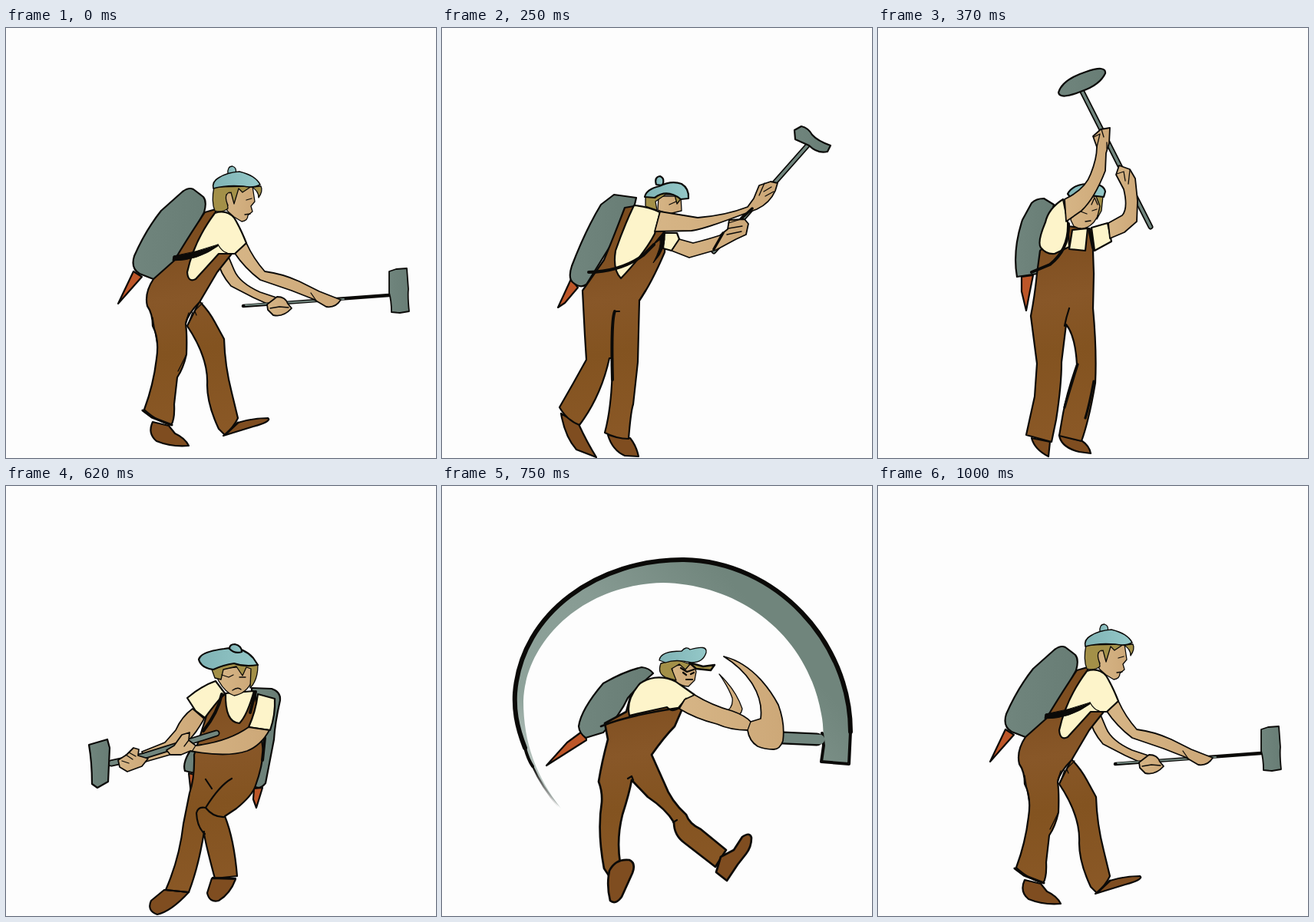
Write an HTML page without scripts that moves like this. It is 560 px wide and 560 px high and loops after 1120 ms.

```html
<!DOCTYPE html>
<html lang="en">
<head>
<meta charset="utf-8">
<title>Hammer swing</title>
<style>
html, body { margin: 0; width: 100%; height: 100%; overflow: hidden; background: #fdfdfd; }
svg { display: block; width: 100%; height: 100%; }
path { stroke: #0b0a08; stroke-width: 2.2; stroke-linejoin: round; stroke-linecap: round; fill: none; }
.brown { fill: url(#brown); }
.shoe { fill: #7f4d20; }
.skin { fill: url(#skin); stroke-width: 1.8; }
.grey { fill: url(#grey); }
.cream { fill: #fdf4ca; }
.cap { fill: url(#cap); }
.hair { fill: #a39048; stroke-width: 1.3; }
.fire { fill: #bd5628; }
.ink { fill: #0b0a08; stroke-width: 1; }
.thin { stroke-width: 1.3; }
.strap { stroke-width: 4; }
.rod { stroke-width: 7; }
.core { stroke: #71867e; stroke-width: 3.5; }
.none { stroke: none; }
.smash .brown, .smash .shoe { stroke-width: 2.7; }

/* Each pose is held for its slot, then hidden until the next loop. */
.pose { visibility: hidden; animation: short 1120ms step-end infinite; }
.long { animation-name: long; }
.rest { animation-name: rest; animation-delay: -120ms; }
.lift { animation-delay: -1000ms; }
.raise { animation-delay: -870ms; }
.top { animation-delay: -750ms; }
.turn { animation-delay: -620ms; }
.wind { animation-delay: -500ms; }
.smash { animation-delay: -370ms; }
.settle { animation-delay: -250ms; }
@keyframes short { 0% { visibility: visible } 10.714% { visibility: hidden } 100% { visibility: hidden } }
@keyframes long { 0% { visibility: visible } 11.607% { visibility: hidden } 100% { visibility: hidden } }
@keyframes rest { 0% { visibility: visible } 21.428% { visibility: hidden } 100% { visibility: hidden } }
</style>
</head>
<body>
<svg viewBox="0 0 560 560">
<defs>
  <linearGradient id="brown" gradientUnits="userSpaceOnUse" x1="200" y1="260" x2="240" y2="530">
    <stop offset="0" stop-color="#7c4c1e"/><stop offset=".35" stop-color="#885728"/>
    <stop offset=".6" stop-color="#835320"/><stop offset="1" stop-color="#8a5826"/>
  </linearGradient>
  <linearGradient id="skin"><stop offset="0" stop-color="#d6b586"/><stop offset="1" stop-color="#cda878"/></linearGradient>
  <linearGradient id="grey"><stop offset="0" stop-color="#70857d"/><stop offset="1" stop-color="#687d75"/></linearGradient>
  <linearGradient id="cap"><stop offset="0" stop-color="#7fb3b5"/><stop offset="1" stop-color="#94c8c8"/></linearGradient>
  <linearGradient id="smear" gradientUnits="userSpaceOnUse" x1="110" y1="400" x2="400" y2="150">
    <stop offset="0" stop-color="#8fa39b" stop-opacity=".4"/><stop offset=".2" stop-color="#8fa39b"/>
    <stop offset=".6" stop-color="#879b93"/><stop offset="1" stop-color="#70857c"/>
  </linearGradient>
  <linearGradient id="tail" gradientUnits="userSpaceOnUse" x1="118" y1="365" x2="152" y2="418">
    <stop offset="0" stop-color="#0b0a08"/><stop offset="1" stop-color="#0b0a08" stop-opacity="0"/>
  </linearGradient>

  <g id="walker">
    <path class="shoe" d="M283 531L302 514Q322 508 341 508Q347 512 322 519Z"/>
    <path class="brown" d="M252 356Q264 368 272 383L284 405Q285 440 294 475L302 508Q297 519 285 530L277 522Q262 490 262 465Q264 430 236 388Z"/>
    <path class="shoe" d="M191 513Q184 528 196 538Q216 546 238 544Q233 534 220 528L212 518Z"/>
    <path class="grey" d="M230 213Q238 207 244 210L257 220Q262 226 258 240L217 315Q207 329 192 327L174 320Q162 313 167 297Q182 263 202 238Z"/>
    <path class="fire" d="M166 317L146 359L177 324Z"/>
    <path class="brown" d="M273 236L259 240Q240 268 219 303L192 327Q180 345 184 362Q191 372 191 388Q200 405 196 431Q192 465 180 497Q196 512 215 517Q220 510 219 490L223 455Q231 443 235 425Q236 400 234 385Q237 372 252 357L275 318L294 294L272 287Z"/>
    <path class="thin" d="M191 377L197 413M234 383L238 371M238 384L243 370M246 369L248 374M247 367L256 358M235 425L224 447"/>
    <path class="strap" style="stroke-width:3" d="M178 498L190 507L216 517M286 529L302 514"/>
    <path class="cream" d="M272 241Q245 277 236 318Q237 332 247 327L277 294L298 294L313 280Q305 260 297 247Q287 236 272 241Z"/>
    <path class="thin" d="M276 282Q282 292 288 293"/>
    <path class="ink" d="M276 282Q248 292 218 297L217 303Q250 303 276 284Z"/>
    <path class="skin thin" d="M290 207L321 206L324 226L319 232L321 239L315 244Q315 251 307 252L297 246L288 238L285 218Z"/>
    <path class="hair" d="M271 207Q267 226 272 238Q282 241 289 235L287 217L293 214L297 229L303 209L308 214L320 206Z"/>
    <path class="skin thin" d="M289 231Q283 217 291 214"/>
    <path class="thin" d="M313 224L320 222M311 243L318 242"/>
    <path class="hair" d="M320 207L332 206Q335 212 329 221Q329 212 320 207Z"/>
    <path class="cap thin" d="M289 190Q288 180 295 180Q301 182 299 189Z"/>
    <path class="cap" style="stroke-width:1.6" d="M270 209Q268 200 277 195Q288 188 304 187Q325 192 331 204Q322 209 309 206Q287 204 270 209Z"/>
  </g>

  <g id="reach">
    <path class="skin" d="M275 301Q279 320 293 336L322 351L342 360L355 352L331 344Q304 332 297 315L289 296Z"/>
    <path style="stroke-width:4.6" d="M309 362L499 348"/><path class="core" style="stroke-width:1.8" d="M312 361L440 353"/>
    <path class="grey" style="stroke-width:1.8" d="M499 317L508 314L522 313L524 340Q523 350 525 369L513 371L502 370Q502 355 499 345Z"/>
    <path class="skin" d="M340 360L353 350Q364 350 367 359L372 365Q361 377 348 374L341 367Z"/>
    <path class="thin" d="M344 365L356 363L368 364"/>
    <path class="skin" d="M297 292L313 280Q322 300 337 317Q360 320 382 330L408 343L436 354Q429 365 417 363L400 353L372 342L331 328Q311 313 297 292Z"/>
    <path class="thin" d="M397 345L404 355"/>
  </g>

  <g id="twister">
    <path class="grey" d="M320 263L346 264Q358 268 357 279Q350 310 349 330L338 387Q330 397 322 390Z"/>
    <path class="fire" d="M323 394L322 408L326 419L334 393ZM238 374L241 401L245 376Z"/>
    <path class="grey" d="M243 340Q229 360 233 371L246 374L252 340Z"/>
    <path class="shoe" d="M206 526L189 540Q183 553 197 558Q215 554 238 529Z"/>
    <path class="shoe" d="M268 511L262 530Q265 543 277 540Q292 531 299 512Z"/>
    <path class="brown" d="M264 290L284 272L324 268Q330 310 335 345Q334 365 325 390Q321 403 300 420L285 430Q297 460 301 508L272 511Q257 455 258 450Q251 495 238 529L208 526Q226 485 231 440Q237 410 239 400Q246 380 245 350Z"/>
    <path d="M285 431Q270 432 260 419Q278 390 294 381M260 419Q250 417 248 426Q249 445 259 453M260 382L268 394M209 526L237 529M269 510L299 511"/>
    <path class="cream" d="M273 254Q255 260 236 276L247 293L259 302Q272 284 285 270Z"/>
    <path class="cream" d="M286 270Q285 308 304 309Q314 299 323 267Z"/>
    <path class="cream" d="M328 271L350 277Q351 298 344 318L316 314Q325 294 328 271Z"/>
    <path class="strap" d="M281 271Q276 295 257 319M325 268L318 295M337 328L334 357"/>
    <path class="skin thin" d="M276 238L276 252Q285 269 297 273Q315 270 322 250L323 234Z"/>
    <path class="hair" d="M268 239L272 250L280 252L283 239L300 235L308 247L313 236L319 238L318 263Q328 253 328 233L296 230Z"/>
    <path d="M281 246L290 249L296 246M304 249L312 249M295 266Q302 261 306 265" class="thin"/>
    <path class="cap" d="M251 226Q253 216 284 212Q308 208 322 224L328 233Q311 236 297 231Q283 233 270 239Q254 237 251 226Z"/>
    <path class="cap" d="M291 212Q291 206 298 206Q307 208 307 216Q298 219 291 212Z"/>
  </g>
</defs>

<g class="pose rest"><use href="#reach"/><use href="#walker"/></g>

<g class="pose long lift">
  <path class="skin" d="M276 299Q288 321 312 325L350 315L370 314L368 298L345 301L314 306L289 290Z"/>
  <path class="rod" d="M347 316L522 238"/><path class="core" d="M347 316L522 238"/>
  <path class="grey" d="M509 215L530 205Q541 226 555 252L535 264Q519 240 509 215Z"/>
  <path class="skin" d="M361 302L378 292L387 302L381 313L366 317Z"/>
  <path class="skin" d="M297 292L313 276L340 287Q372 284 401 278L419 268L436 272L431 284L415 291L381 301L336 308Q316 303 297 292Z"/>
  <use href="#walker"/>
</g>

<g class="pose raise">
  <path class="fire" d="M168 327L151 364L160 358L177 338Z"/>
  <path class="grey" d="M224 217L253 221L250 234L188 334Q180 340 170 331Q164 325 169 310Q187 263 207 230Z"/>
  <path class="shoe" d="M155 502Q160 532 175 549L201 559Q189 540 178 516ZM216 530Q222 550 238 557L256 558Q253 544 245 534Z"/>
  <path class="brown" d="M250 232L238 234Q222 276 211 302L183 342L186 400L188 432Q171 463 153 494Q163 511 179 517Q207 480 218 430L222 430Q222 490 212 527Q227 535 243 535Q246 498 249 490L255 435L257 355Q273 332 290 292L291 267Z"/>
  <path class="strap" d="M225 369Q220 380 222 458"/><path d="M225 369L231 369M265 342L257 355"/>
  <path class="cream" d="M250 231Q268 232 284 240L277 268Q265 292 233 326Q222 315 226 290Q237 258 250 231Z"/>
  <path class="cream" d="M290 267L306 267L309 275L299 290L288 287Z"/>
  <path class="strap" d="M191 318Q233 317 262 296L276 282"/>
  <path class="ink" d="M274 283L289 265Q294 286 275 306Q286 285 284 276Z"/>
  <path class="skin thin" d="M282 219L311 219L312 238L296 242L281 237Z"/>
  <path class="hair" d="M265 221L265 232L280 237L278 226L291 217L303 217L306 229L313 220L290 212Z"/>
  <path class="thin" d="M296 230L305 226"/>
  <path class="cap" d="M279 204Q276 194 284 193Q291 196 287 205Z"/>
  <path class="cap" d="M264 220Q266 210 283 206Q299 198 312 203Q322 209 321 222L311 223Q293 209 277 221Z"/>
  <path class="rod" d="M354 291L476 153"/><path class="core" d="M354 291L476 153"/>
  <path class="grey" d="M459 133L468 128Q477 130 482 139Q489 147 506 153L502 161Q489 164 478 153L460 145Z"/>
  <path class="skin" d="M309 275L327 280Q347 275 362 270L372 262L374 250L394 249L399 255L396 269L383 275L357 289L322 299L299 290Z"/>
  <path class="thin" d="M373 261L391 258M371 269L390 265M373 254L386 250"/>
  <path class="skin" d="M284 239L333 247Q370 244 398 233L406 222L413 205L428 200L437 202L434 212Q427 228 410 236L380 247Q340 262 325 264L277 265Z"/>
  <path class="thin" d="M420 202L413 218M429 207L419 213M432 213L421 219"/>
  <path style="stroke-width:3.5" d="M404 235L390 248M366 267L354 288"/>
</g>

<g class="pose long top">
  <path class="fire" d="M187 324L187 343L193 368L197 347L202 322Z"/>
  <path class="grey" d="M200 228Q206 222 216 222L229 230L215 288L208 320L181 324Q175 290 188 250Z"/>
  <path class="shoe" d="M200 534Q204 549 222 558L224 539ZM236 530Q238 546 262 552L277 554Q275 544 266 538Z"/>
  <path class="brown" d="M247 258L211 290L207 320Q204 350 199 375L207 437L204 480L193 530L226 539L232 510Q239 465 239 435L245 386Q257 401 259 438Q246 475 241 502L236 531L265 538Q275 510 283 462Q285 420 280 365L281 320L279 262Z"/>
  <path d="M249 365Q245 377 243 388"/><path class="strap" style="stroke-width:3.2" d="M260 438Q247 480 243 494M281 460Q275 492 270 508"/>
  <path class="cream" d="M241 223Q222 235 218 253Q207 279 212 286Q219 295 230 294L249 285L247 252Z"/>
  <path class="cream" d="M253 263L273 261L270 290L249 288ZM278 260L299 254L304 278L282 290Z"/>
  <path class="strap" d="M248 255Q249 288 224 308L200 318M275 262L280 286"/>
  <path class="skin thin" d="M256 228L290 217Q294 236 281 253Q269 266 255 258L251 250Z"/>
  <path class="hair" d="M284 219L293 219L291 238L285 249L289 232Z"/>
  <path class="thin" d="M264 239L272 242M279 238L285 236M270 252L277 251M278 230L282 221L286 230"/>
  <path class="cap" d="M247 216Q253 204 272 203Q294 202 296 213L294 220L277 218L256 228Z"/>
  <path class="rod" d="M266 83L355 259"/><path class="core" d="M266 83L355 259"/>
  <path class="grey" d="M235 84Q240 67 271 57Q297 48 296 59Q289 74 266 82Q237 94 235 84Z"/>
  <path class="skin" d="M300 254L318 244Q326 235 320 210L310 191L314 179L328 184L335 196L338 225L337 252L321 266L302 274Z"/>
  <path class="thin" d="M311 190L320 187L322 199M328 185L326 203"/>
  <path class="skin" d="M243 223Q270 210 277 190Q285 170 285 155L280 141L290 132L302 130L301 150L297 163L296 186Q282 222 265 238L245 252Z"/>
  <path class="thin" d="M281 142L289 138L285 155M291 132L294 142M298 149L298 157"/>
</g>

<g class="pose turn">
  <use href="#twister"/>
  <path class="rod" d="M236 272L134 192"/><path class="core" d="M236 272L134 192"/>
  <path class="grey" d="M137 162L151 178Q137 202 116 218L94 208Q105 181 137 162Z"/>
  <path class="skin" d="M237 280L211 263L185 247L175 231L185 219L201 226L208 240L246 263L250 279Z"/>
  <path class="skin" d="M344 318Q318 340 292 325L235 283L215 271L219 254L236 253L247 270L298 302L318 313Z"/>
</g>

<g class="pose long wind">
  <use href="#twister"/>
  <path class="skin" d="M243 290Q229 300 221 318L207 334L177 346L182 359L217 349Q242 333 258 303Z"/>
  <path d="M137 361L178 352L274 322" style="stroke-width:9"/><path class="core" d="M137 361L178 352L274 322" style="stroke-width:5.5"/>
  <path class="grey" d="M108 337L132 330L135 341L133 385L119 393L112 388Q112 360 108 337Z"/>
  <path class="skin" d="M146 357L157 350L166 341L173 343L172 351L185 355L177 365L158 372L148 366Z"/>
  <path class="thin" d="M156 350L165 356M160 347L169 352M151 358L160 361"/>
  <path class="skin" d="M316 314Q289 333 247 338L238 331L239 321L229 324L219 338L209 344L214 350L228 350L240 345Q287 354 314 345Q332 338 343 318Z"/>
  <path class="thin" d="M238 331L232 339M247 338L242 346"/>
</g>

<g class="pose smash">
  <path class="none" style="fill:url(#smear)" d="M155 420Q128 392 108 341C96 310 94 290 95 270C103 164 205 95 315 96C435 98 532 203 532 320L530 362L494 360Q499 320 494 297C475 190 385 128 288 126C180 128 108 205 106 280C106 335 123 378 155 420Z"/>
  <path style="stroke-width:6" d="M108 341C96 310 94 290 95 270C103 164 205 95 315 96C435 98 532 203 532 320"/>
  <path style="stroke-width:4" d="M108 341Q112 356 118 365M532 320L530 362L494 359L497 338L495 322"/>
  <path style="stroke:url(#tail);stroke-width:2.5" d="M118 365Q130 392 152 418"/>
  <path class="fire" d="M182 320L163 334L136 364L188 331L187 322Z"/>
  <path class="grey" d="M178 313Q181 291 210 257Q238 241 260 236Q270 237 275 244Q254 262 242 276Q232 298 210 321L187 328Q179 322 178 313Z"/>
  <path class="brown" d="M246 272L240 294L212 309L216 330Q208 360 204 385Q209 398 208 412Q202 450 211 498L219 510L232 491Q227 460 235 428Q244 400 247 383L268 405Q292 421 302 438Q302 455 316 465L356 496L370 474L337 447Q322 440 318 428Q298 410 290 388Q282 370 273 350Q290 326 303 313L313 290Z"/>
  <path d="M242 381L247 378L249 383M301 438L306 435"/>
  <path class="shoe" d="M218 501Q226 485 244 487Q253 491 248 504L234 535Q226 546 219 540Q214 520 218 501Z"/>
  <path class="shoe" d="M357 503L363 483L380 474L391 457Q401 450 403 458Q403 470 396 479L385 493L371 514Z"/>
  <path class="cream" d="M244 299Q239 278 258 257Q280 243 305 255L329 272L310 288Q300 296 293 288L270 293Z"/>
  <path class="strap" style="stroke-width:2.6" d="M207 313Q240 299 308 289M308 289L318 277"/>
  <path class="skin thin" d="M299 234L328 232L331 242L329 253L321 261Q311 261 302 252Z"/>
  <path class="hair" d="M285 231Q280 244 291 249L305 253L299 238L309 232L317 239L323 232L305 226Z"/>
  <path d="M311 237L319 242L328 239M314 243L318 246M324 245L328 243M318 252L326 252"/>
  <path class="hair" style="stroke-width:2.4" d="M322 230L340 235L355 233L350 240L331 238Z"/>
  <path class="cap thin" d="M283 227Q284 215 312 215Q318 208 323 213Q346 206 344 217Q340 230 325 230Q304 225 291 230Z"/>
  <path style="stroke-width:17" d="M444 328L488 330"/><path class="core" style="stroke-width:12.5" d="M444 328L492 330"/>
  <path class="skin thin" d="M361 245Q383 266 391 290Q390 300 378 300L367 295Q380 290 378 276Q373 262 361 245Z"/>
  <path class="skin" d="M329 272Q352 286 378 293Q395 299 402 307L415 303C419 272 399 242 367 222C407 232 430 270 438 285Q447 309 444 332Q440 343 432 343Q420 343 411 339Q400 332 398 318Q376 318 358 310Q330 303 309 290L316 278Z"/>
  <path class="thin" d="M402 307L398 318"/>
</g>

<g class="pose long settle">
  <use href="#reach" transform="rotate(5 300 290)"/><use href="#walker"/>
</g>
</svg>
</body>
</html>
```
